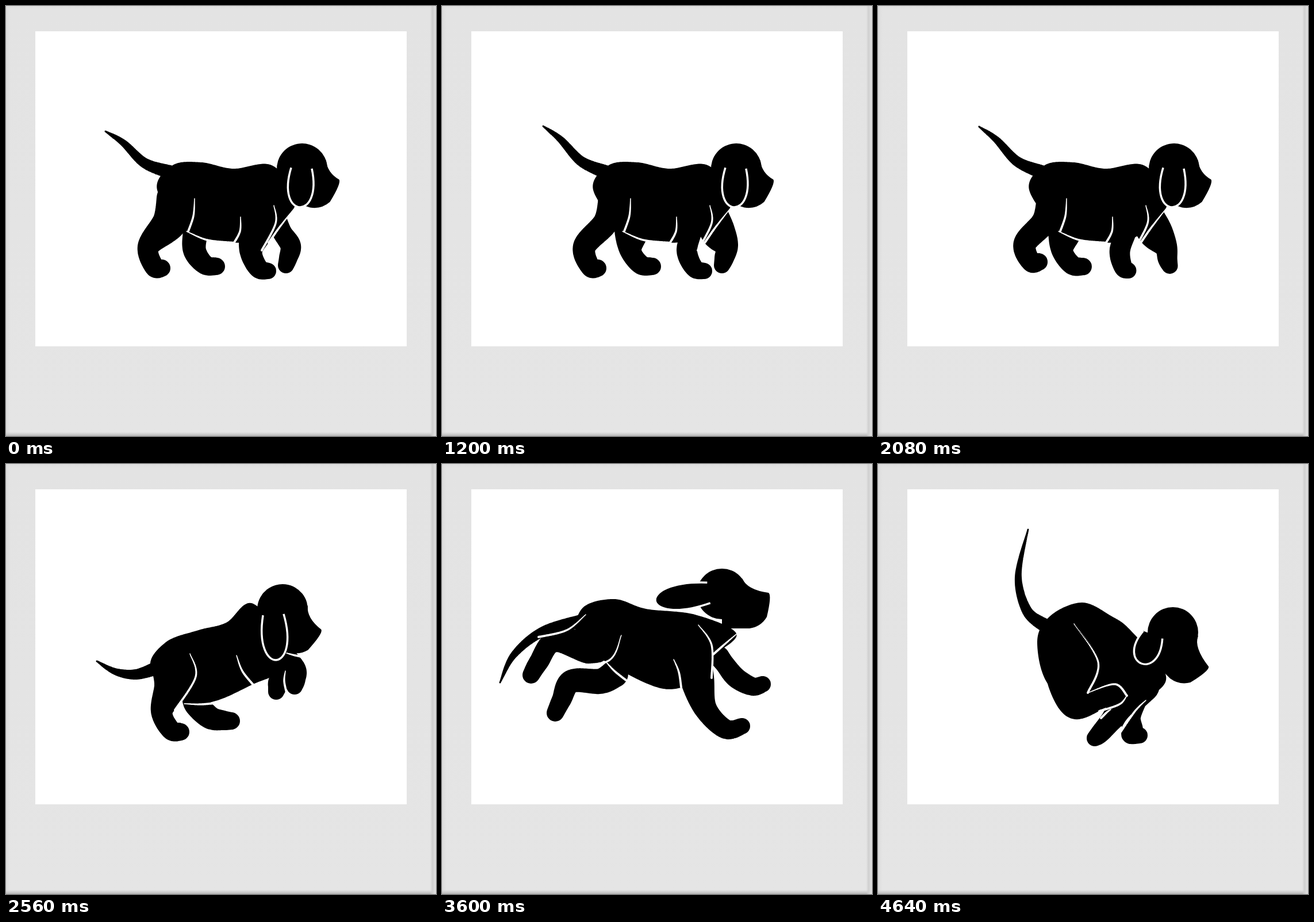
An HTML page with a canvas that plays this animation: 748x748 px, repeating every 4720 ms.

```html
<!DOCTYPE html>
<html lang="en">
<head>
<meta charset="utf-8">
<title>Running puppy</title>
<style>
html, body { margin: 0; width: 100%; height: 100%; overflow: hidden; background: #e4e4e4; }
.card {
  position: absolute; left: 0; top: 0; width: 748px; height: 748px; overflow: hidden;
  background:
    linear-gradient(90deg, transparent 738px, #cfcfcf 742px, #dedede 746px),
    linear-gradient(transparent 741px, #cccccc 745px, #b4b4b4 748px),
    linear-gradient(90deg, #dcdcdc, transparent 8px),
    linear-gradient(#dedede, #e3e3e3 8px, #e5e5e5);
}
.photo { position: absolute; left: 50.5px; top: 43.5px; width: 646.5px; height: 548.5px; background: #fff; }
canvas { position: absolute; left: 0; top: 0; }
</style>
</head>
<body>
<div class="card"><div class="photo"></div><canvas id="stage" width="748" height="748"></canvas></div>
<script>
const STEP = 80, COUNT = 59, WALK_CYCLE = 10, WALK_END = 28, LEAP = 32, RUN = 36, RUN_CYCLE = 9;
const SKULL = 44, EAR = 18;

// Joint radii, from the body outwards.
const RADII = {
  tail: [12, 9, 6, 1.5],
  nearHind: [34, 30, 19, 17, 15], farHind: [24, 22, 20, 17, 15],
  nearFore: [30, 30, 20, 17, 14], farFore: [18, 17, 18, 16, 14]
};
const SEAM = [.8, 1.8, 2];
const SEAMS = ['thigh', 'belly', 'shoulder', 'chest', 'throat', 'paw'];

const parse = pose => Object.fromEntries(Object.entries(pose).map(
  ([part, s]) => [part, s.split(' ').map(p => p.split(',').map(Number))]));
const mix = (a, b, t) => a.map((p, i) => p.map((v, j) => v + (b[i][j] - v) * t));
const mixPose = (a, b, t) => Object.fromEntries(Object.keys(a).map(k => [k, mix(a[k], b[k], t)]));
const shift = (pts, dx, dy, weight = () => 1) =>
  pts.map(([x, y], i) => [x + dx * weight(i), y + dy * weight(i)]);
const outward = i => i / 4;

// Limbs list their joints; head is centre, then muzzle length and tilt in degrees; ear is root and tip.
const stand = parse({
  tail: '285,289 241,273 204,238 173,218',
  body: '263,320 290,277 340,272 395,283 462,277 505,332 480,378 440,405 385,411 318,391',
  head: '515,283 70,18',
  ear: '514,282 511,350',
  nearHind: '296,335 285,376 248,418 258,454 271,456',
  farHind: '335,360 330,390 328,425 346,450 366,453',
  nearFore: '440,350 437,385 426,425 439,456 456,461',
  farFore: '468,365 480,393 495,417 491,438 487,451',
  thigh: '328,335 326,365 317,392',
  belly: '314,392 350,407 396,412',
  shoulder: '408,367 407,392 396,413',
  chest: '466,347 469,378 445,425',
  throat: '500,354 475,386 457,412',
  paw: '220,380 220,380 220,380'
});
const crouch = parse({
  tail: '265,354 226,366 190,361 158,343',
  body: '252,355 278,310 335,289 383,276 430,243 495,325 470,364 430,383 365,412 312,414',
  head: '481,253 79,29',
  ear: '465,262 470,341',
  nearHind: '287,350 288,385 271,430 287,463 304,466',
  farHind: '330,400 332,418 355,441 378,446 392,447',
  nearFore: '450,330 465,332 501,356 504,374 502,387',
  farFore: '470,350 478,362 474,380 472,388 470,396',
  thigh: '320,330 330,370 294,428',
  belly: '310,417 340,418 372,415',
  shoulder: '401,333 411,360 430,384',
  chest: '486,360 484,378 489,402',
  throat: '488,329 503,333 520,336',
  paw: '220,380 220,380 220,380'
});
const stretch = parse({
  tail: '245,273 175,292 125,332 101,380',
  body: '235,300 245,250 300,235 355,252 440,262 512,295 472,335 450,372 385,391 287,345',
  head: '487,226 84,0',
  ear: '464,224 371,238',
  nearHind: '270,295 260,318 196,308 168,345 155,367',
  farHind: '300,365 275,378 225,378 208,410 197,433',
  nearFore: '435,325 443,370 458,425 493,461 522,456',
  farFore: '482,335 492,348 512,372 540,387 558,383',
  thigh: '312,298 288,343 205,350',
  belly: '285,344 300,360 320,376',
  shoulder: '403,340 412,362 416,388',
  chest: '446,280 469,315 469,372',
  throat: '512,296 490,315 472,331',
  paw: '250,262 217,289 168,301'
});
const gather = parse({
  tail: '290,281 259,255 244,195 261,114',
  body: '277,310 300,264 355,241 405,264 440,290 500,365 478,403 440,432 380,415 300,388',
  head: '513,293 89,45',
  ear: '478,297 458,347',
  nearHind: '322,320 325,378 343,425 390,408 416,400',
  farHind: '320,330 330,380 342,415 375,410 400,402',
  nearFore: '460,385 440,403 410,441 387,468 377,477',
  farFore: '450,410 440,440 443,463 440,471 455,472',
  thigh: '341,278 383,345 365,398',
  belly: '365,398 412,383 433,403',
  shoulder: '405,427 398,432 388,442',
  chest: '466,411 447,430 422,466',
  throat: '440,437 432,448 424,462',
  paw: '433,403 420,418 385,430'
});

// Legs trade places twice per cycle.
function stride(a, b, phase, dx, lift) {
  const s = Math.sin(2 * Math.PI * phase);
  return shift(mix(a, b, (1 - Math.cos(2 * Math.PI * phase)) / 2), -dx * s, -lift * Math.max(0, s), outward);
}

function walk(n) {
  const p = n % WALK_CYCLE / WALK_CYCLE;
  const hind = q => stride(stand.nearHind, stand.farHind, q, 0, 18);
  const fore = q => stride(stand.nearFore, stand.farFore, q, 40, 0);
  const nod = 5 * (Math.cos(2 * Math.PI * (p - .8)) - Math.cos(.4 * Math.PI));
  return { ...stand,
    tail: shift(stand.tail, 3 * Math.sin(Math.PI * p), -9 * Math.sin(Math.PI * p) ** 2, i => i / 3),
    head: [shift(stand.head, nod, 0)[0], stand.head[1]],
    ear: shift(stand.ear, nod, 0),
    nearHind: hind(p), farHind: hind(p + .5),
    nearFore: fore(p), farFore: fore(p + .5)
  };
}

// Hind legs push down while the head rises and the forelegs reach out.
function spring(t) {
  const pose = mixPose(crouch, stretch, t), k = Math.sin(Math.PI * t);
  return { ...pose,
    head: [shift(pose.head, 5 * k, -24 * k)[0], pose.head[1]],
    ear: shift(pose.ear, 5 * k, -24 * k),
    nearHind: shift(pose.nearHind, 0, 55 * k, outward),
    farHind: shift(pose.farHind, 0, 45 * k, outward),
    farFore: shift(pose.farFore, 50 * k, -15 * k, outward)
  };
}

function poseAt(n) {
  if (n <= WALK_END) return walk(n);
  if (n < LEAP) return mixPose(walk(n), crouch, (n - WALK_END) / (LEAP - WALK_END));
  const p = (n - RUN + RUN_CYCLE) % RUN_CYCLE;
  return p <= 4 ? mixPose(stretch, gather, p / 4) : spring((p - 5) / 4);
}

const ctx = document.getElementById('stage').getContext('2d');

// Samples a Catmull-Rom curve through points of any dimension.
function curve(pts, closed) {
  const n = pts.length, out = [], parts = 32;
  const at = i => pts[closed ? (i + n) % n : Math.max(0, Math.min(n - 1, i))];
  for (let i = 0; i < (closed ? n : n - 1); i++) {
    const [a, b, c, d] = [at(i - 1), at(i), at(i + 1), at(i + 2)];
    for (let k = 0; k <= parts; k++) {
      const t = k / parts;
      out.push(b.map((v, j) => v + t / 2 * (c[j] - a[j]
        + t * (2 * a[j] - 5 * v + 4 * c[j] - d[j] + t * (3 * (v - c[j]) + d[j] - a[j])))));
    }
  }
  return out;
}

// Sweeps a disc of changing radius along a curve.
function brush(pts, radii) {
  ctx.beginPath();
  for (const [x, y, r] of curve(pts.map((p, i) => [...p, radii[i]]))) {
    ctx.moveTo(x + r, y);
    ctx.arc(x, y, Math.max(r, .5), 0, 7);
  }
  ctx.fill();
}

function drawBody(pts) {
  ctx.beginPath();
  curve(pts, true).forEach(p => ctx.lineTo(...p));
  ctx.fill();
}

function drawHead([[x, y], [len, tilt]]) {
  ctx.save();
  ctx.translate(x, y);
  ctx.rotate(tilt * Math.PI / 180);
  ctx.beginPath();
  ctx.arc(0, 0, SKULL, 0, 7);
  ctx.fill();
  ctx.beginPath();
  ctx.moveTo(35, -27);
  ctx.quadraticCurveTo(44, -7, len - 3, -2);
  ctx.quadraticCurveTo(len + 3, 2, len - 6, 40);
  ctx.quadraticCurveTo(len - 16, 57, len - 36, 60);
  ctx.lineTo(0, 60);
  ctx.lineTo(0, 0);
  ctx.fill();
  ctx.restore();
}

function drawEar([[x, y], [tx, ty]]) {
  const len = Math.hypot(tx - x, ty - y);
  ctx.save();
  ctx.translate(x, y);
  ctx.rotate(Math.atan2(ty - y, tx - x));
  ctx.beginPath();
  ctx.moveTo(0, EAR);
  ctx.bezierCurveTo(len * 4 / 3, EAR * 2.3, len * 4 / 3, -EAR * 2.3, 0, -EAR);
  ctx.fill();
  ctx.lineWidth = 3.5;
  ctx.stroke();
  ctx.restore();
}

function draw(pose) {
  const limb = part => brush(pose[part], RADII[part]);
  ctx.clearRect(0, 0, 748, 748);
  ctx.fillStyle = '#000';
  ctx.strokeStyle = '#fff';
  ['tail', 'farHind', 'farFore'].forEach(limb);
  drawBody(pose.body);
  drawHead(pose.head);
  ['nearHind', 'nearFore'].forEach(limb);
  drawEar(pose.ear);
  ctx.fillStyle = '#fff';
  SEAMS.forEach(part => brush(pose[part], SEAM));
}

const start = performance.now();
let shown = -1;
function tick() {
  const n = Math.floor((performance.now() - start) / STEP) % COUNT;
  if (n !== shown) draw(poseAt(shown = n));
  requestAnimationFrame(tick);
}
tick();
</script>
</body>
</html>
```
